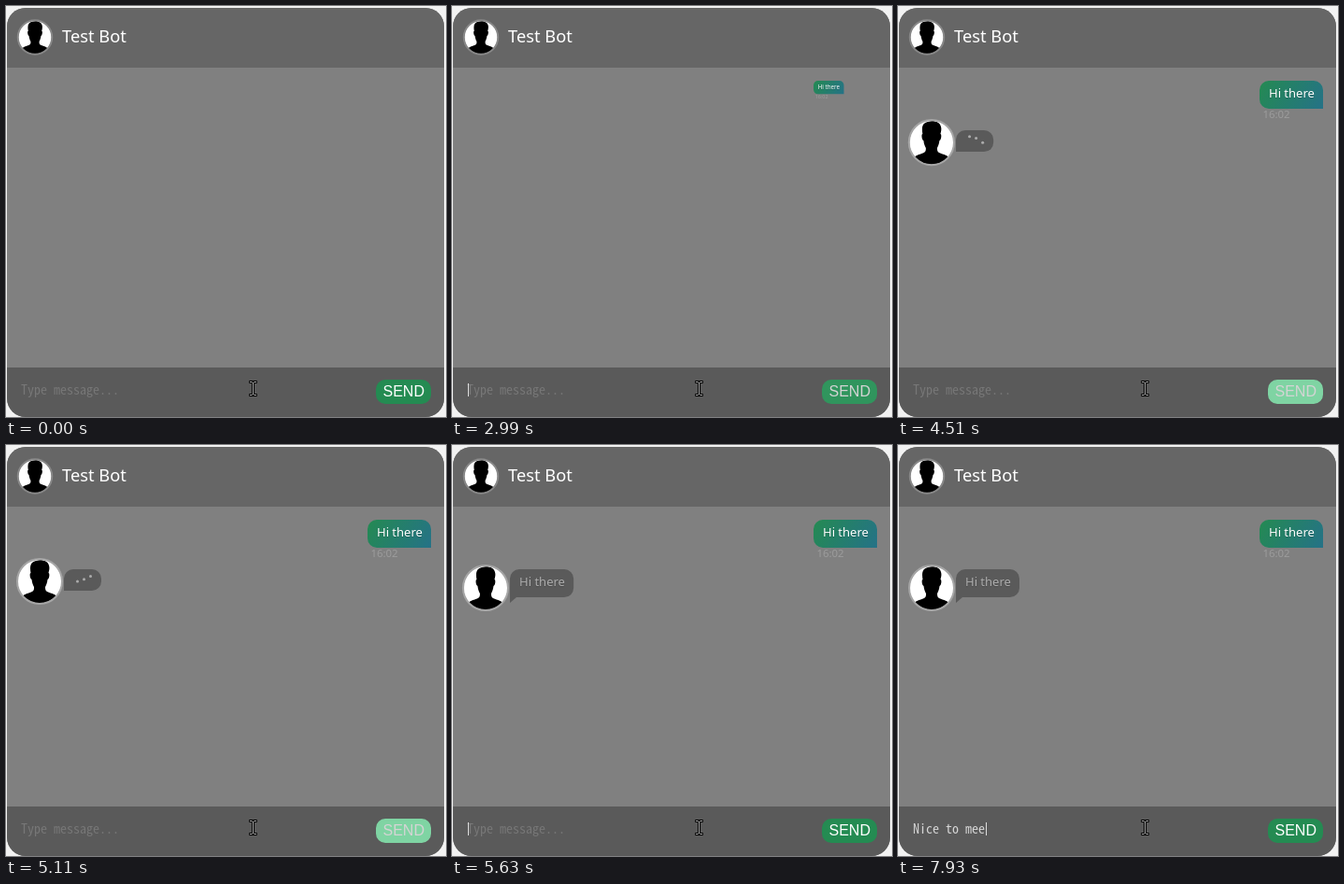
Animation of 471 by 440 pixels, one loop 8 s. Source, as an HTML page:

```html
<!DOCTYPE html>
<html lang="en">
<head>
<meta charset="utf-8">
<title>Chat bot</title>
<style>
  html, body { margin: 0; width: 100%; height: 100%; overflow: hidden; background: #f2f2f2; }
  svg { display: block; }
  text { font-family: "Noto Sans", "Open Sans", sans-serif; white-space: pre; }
  .title { font-size: 18.3px; fill: #fff; }
  .msg { font-size: 13px; font-weight: 500; text-shadow: 0 1px 1px rgba(0, 0, 0, .2); }
  .time { font-size: 11.4px; font-weight: 500; fill: #9c9c9c; }
  .field {
    font: 300 14px "Noto Sans Mono CJK JP", "Noto Sans Mono", monospace;
    font-size-adjust: ch-width .5;
  }
  .send { font: 16px "Liberation Sans", Arial, sans-serif; }
  .shade { fill: #5a5a5a; }
</style>
</head>
<body>
<svg width="471" height="440" viewBox="0 0 471 440">
  <defs>
    <!-- 120deg gradient across the 68 x 30 bubble -->
    <linearGradient id="sent" gradientUnits="userSpaceOnUse" x1="1.99" y1="-3.48" x2="66.01" y2="33.48">
      <stop stop-color="#248a52"/><stop offset="1" stop-color="#257287"/>
    </linearGradient>
    <clipPath id="card"><rect x="1" y="2" width="468" height="438" rx="20"/></clipPath>
    <clipPath id="disc"><circle r="23.5"/></clipPath>
    <g id="avatar">
      <circle r="23.5" fill="#fff"/>
      <path clip-path="url(#disc)" d="M-9.5-9C-11-17-9-21-4-22C2-24 9-22 10-17C11-14 10-11 9.5-9
        C11-9 10.500-3 8.500-2C8 2 7 4 6 6C6 9 6.500 10 8 11C13 13 18 14 20 18V26H-20V18
        C-18 14-13 13-8 11C-6 10-6 8-6 6C-7 4-8 2-8.500-2C-10.500-3-11-9-9.500-9Z"/>
    </g>
  </defs>

  <g clip-path="url(#card)">
    <rect width="471" height="440" fill="#808080"/>
    <rect width="471" height="66" fill="#666"/>
    <rect class="shade" y="387" width="471" height="53"/>
  </g>
  <g transform="translate(31 33.500) scale(.76)">
    <use href="#avatar"/>
    <circle r="24" fill="none" stroke="#888" stroke-width="2.600"/>
  </g>
  <text class="title" x="60" y="39">Test Bot</text>

  <g id="user">
    <path fill="url(#sent)" d="M10 0H58A10 10 0 0 1 68 10V30H10A10 10 0 0 1 0 20V10A10 10 0 0 1 10 0Z"/>
    <text class="msg" x="10" y="18" fill="#fff">Hi there</text>
    <text class="time" x="3.500" y="40">16:02</text>
  </g>

  <g id="loading">
    <g transform="translate(-26 13)">
      <use href="#avatar"/><circle r="24" fill="none" stroke="#a6a6a6" stroke-width="2"/>
    </g>
    <path class="shade" d="M10 0H30A10 10 0 0 1 40 10V13A10 10 0 0 1 30 23H0V10A10 10 0 0 1 10 0Z"/>
    <g id="balls" fill="#acacac">
      <circle r="1.500" cx="14.500"/><circle r="1.500" cx="21.500"/><circle r="1.500" cx="28.500"/>
    </g>
  </g>

  <g id="reply">
    <g transform="translate(-26 20)">
      <use href="#avatar"/><circle r="24" fill="none" stroke="#a6a6a6" stroke-width="2"/>
    </g>
    <path class="shade" d="M10 0H58A10 10 0 0 1 68 10V20A10 10 0 0 1 58 30H7L0 36V10A10 10 0 0 1 10 0Z"/>
    <text class="msg" x="10" y="18" fill="#acacac">Hi there</text>
  </g>

  <text id="field" class="field" x="16" y="416"></text>
  <rect id="caret" x="17" y="404" width="1" height="14" fill="#ddd"/>
  <rect id="button" x="396" y="400" width="59" height="26" rx="10"/>
  <text id="label" class="send" x="403.500" y="418">SEND</text>

  <g fill="none">
    <path id="beam" d="M260.500 402.500H263L264.500 403.500L266 402.500H268.500M264.500 403.500V415.500M260.500 416.500H263L264.500 415.500L266 416.500H268.500" stroke="#000" stroke-width="3"/>
    <use href="#beam"/>
    <path d="M261 402.500H263L264.500 403.500L266 402.500H268M264.500 403.500V415.500M261 416.500H263L264.500 415.500L266 416.500H268" stroke="#aaa"/>
  </g>
</svg>

<script>
const LOOP = 8000;
const SENT = 2966, TYPING = 4165, REPLY = 5250;
const GREEN = [36, 139, 82], PALE = [127, 212, 163];
const $ = id => document.getElementById(id);

// [percent of 500 ms, scale]
const BOUNCE = [
  [0, 0], [4.7, .45], [9.41, .883], [14.11, 1.141], [18.72, 1.212], [24.32, 1.151],
  [29.93, 1.048], [35.54, .979], [41.04, .961], [52.15, .991], [63.26, 1.007],
  [85.49, .999], [100, 1]
];

const FIRST = { text: 'Hi there', keys: [1500, 1660, 1820, 2140, 2280, 2420, 2560, 2700] };
const SECOND = {
  text: 'Nice to mee',
  keys: [6010, 6220, 6360, 6580, 6880, 7030, 7180, 7320, 7630, 7780, 7930]
};
const CARET_ON = [[780, 1310], [1500, SENT + 100], [REPLY, 5765], [6010, LOOP]];

function bounce(ms) {
  const p = ms / 5;
  if (p >= 100) return 1;
  const i = BOUNCE.findIndex(([at]) => at > p);
  const [a, from] = BOUNCE[i - 1], [b, to] = BOUNCE[i];
  return from + (to - from) * (p - a) / (b - a);
}

function bezier(x1, y1, x2, y2) {
  const curve = (s, a, b) => 3 * (1 - s) ** 2 * s * a + 3 * (1 - s) * s * s * b + s ** 3;
  return x => {
    let lo = 0, hi = 1;
    for (let i = 0; i < 24; i++) {
      const mid = (lo + hi) / 2;
      if (curve(mid, x1, x2) < x) lo = mid; else hi = mid;
    }
    return curve(lo, y1, y2);
  };
}
const ease = bezier(.25, .1, .25, 1);
const hop = bezier(0, 0, .15, 1);
const clamp = x => Math.min(1, Math.max(0, x));

function pop(id, x, y, t, start, end = LOOP) {
  const shown = t >= start && t < end;
  $(id).setAttribute('visibility', shown ? 'visible' : 'hidden');
  if (shown) $(id).setAttribute('transform', `translate(${x} ${y}) scale(${bounce(t - start)})`);
}

function drawBalls(t) {
  [...$('balls').children].forEach((ball, i) => {
    const turn = Math.max(0, t - TYPING - i * 150) / 450;
    const part = turn % 1;
    const lift = hop(Math.floor(turn) % 2 ? 1 - part : part);
    ball.setAttribute('cy', 16.5 - 10 * lift);
  });
}

function drawField(t) {
  const line = t < SENT ? FIRST : SECOND;
  const count = line.keys.filter(key => key <= t).length;
  $('field').textContent = count ? line.text.slice(0, count) : 'Type message...';
  $('field').setAttribute('fill', count ? '#d6d6d6' : '#777');
  $('caret').setAttribute('x', 17 + 7 * count);
  const on = CARET_ON.some(([from, to]) => t >= from && t < to);
  $('caret').setAttribute('visibility', on ? 'visible' : 'hidden');
}

function drawButton(t) {
  const fade = ease(clamp((t - SENT) / 200)) - ease(clamp((t - REPLY - 25) / 200));
  const rgb = GREEN.map((c, i) => Math.round(c + (PALE[i] - c) * fade));
  $('button').setAttribute('fill', `rgb(${rgb})`);
  $('label').setAttribute('fill', t >= SENT && t < REPLY ? '#d4d4d4' : '#fff');
}

function draw(t) {
  pop('user', 387, 80, t, SENT);
  pop('loading', 62, 133, t, TYPING, REPLY);
  pop('reply', 62, 133, t, REPLY);
  drawBalls(t);
  drawField(t);
  drawButton(t);
}

const begin = performance.now();
function tick() {
  draw((performance.now() - begin) % LOOP);
  requestAnimationFrame(tick);
}
tick();
</script>
</body>
</html>
```
